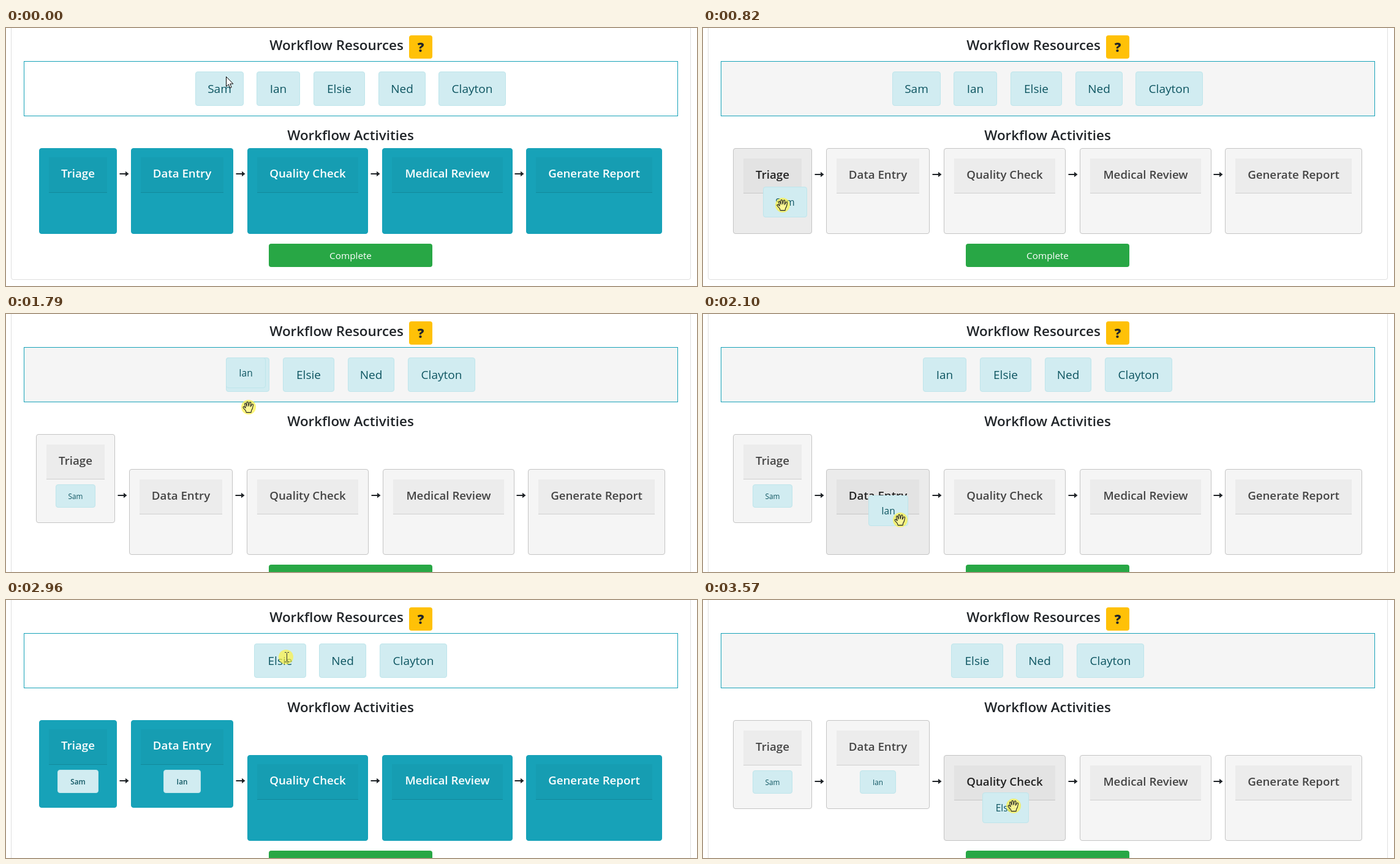
Write an HTML page that moves like this. It is 1128 by 421 pixels and loops after 3.67 s.

```html
<!DOCTYPE html>
<html lang="en">
<head>
<meta charset="utf-8">
<title>Workflow</title>
<style>
  html, body { margin: 0; width: 100%; height: 100%; overflow: hidden; background: #fff; }
  body { font-family: "Open Sans", "Noto Sans", sans-serif; color: #212529; }
  #stage { position: relative; width: 1128px; height: 421px; overflow: hidden; }
  #stage * { box-sizing: border-box; }
  #stage div { position: absolute; text-align: center; white-space: nowrap; }
  svg { position: absolute; overflow: visible; }

  .card { border: 1px solid #dfdfdf; border-radius: 4px; }
  .title { height: 30px; line-height: 30px; font-size: 22.4px; font-weight: 600; }
  .help { left: 658px; top: 12px; width: 38px; height: 38px; line-height: 38px; border-radius: 4px;
          background: #ffc107; font-size: 21px; font-weight: 800; }
  .pool { left: 29px; top: 54px; width: 1068px; height: 90px; border: 1px solid #17a2b8; }
  .tile, .chip, .ghost { background: #d1ecf1; border: 1px solid #bee5eb; border-radius: 4px; color: #0c5460; }
  .tile { height: 56px; line-height: 55px; font-size: 19px; }
  .chip { height: 38px; line-height: 37px; font-size: 11.7px; font-weight: 600; }
  .ghost { height: 50px; line-height: 49px; font-size: 15.5px; }
  .step { border-radius: 4px; background: #17a2b8; border: 1px solid #17a2b8; color: #fff; }
  .head { left: 15px; right: 15px; top: 14px; height: 58px; line-height: 52px; font-size: 18.7px; font-weight: 600;
          background: rgba(0,0,0,.03); border-bottom: 1px solid rgba(0,0,0,.125); }
  .done { left: 429px; width: 267px; height: 38px; line-height: 38px; border-radius: 4px;
          background: #28a745; color: #fff; font-size: 15.3px; }

  .drag .pool { background: #f5f5f5; }
  .drag .step { background: #f5f5f5; border-color: #c4c4c4; color: #444; }
  .drag .head { left: 16px; right: 16px; top: 16px; height: 57px; line-height: 51px; background: rgba(0,0,0,.035); }
  .drag .chip { font-weight: 400; }
  .drag .pool.over { background: #ececec; }
  .drag .step.over { background: #ebebeb; color: #222; }
</style>
</head>
<body>
<div id="stage"></div>
<script>
const LOOP = 3670, DROP_SHIFT = 57, GHOST_LAG = 80;
const stage = document.getElementById('stage');

// name, tile width, ghost width, chip width, grab offset
const people = [
  { name: 'Sam', w: 79, ghost: 72, chip: 67, grab: [32, 30] },
  { name: 'Ian', w: 71, ghost: 65, chip: 61, grab: [52, 40] },
  { name: 'Elsie', w: 84.4, ghost: 76, grab: [51, 22] },
  { name: 'Ned', w: 76.5 },
  { name: 'Clayton', w: 110 }
];
// label, [left, right] at rest, [left, right] while dragging
const steps = [
  ['Triage', [54, 181], [49, 178]],
  ['Data Entry', [204, 371], [201, 370]],
  ['Quality Check', [394, 591], [393, 592]],
  ['Medical Review', [614, 827], [615, 830]],
  ['Generate Report', [849, 1071], [852, 1076]]
];
const drags = [
  { press: 150, start: 250, drop: 930 },
  { press: 1540, start: 1740, drop: 2400 },
  { press: 2860, start: 3010, drop: LOOP }
];
// time, x, y of the pointer
const path = [
  [0, 359, 79], [50, 357, 82], [150, 341, 101], [250, 341, 101], [320, 334, 112],
  [370, 321, 132], [460, 257, 193], [600, 180, 252], [740, 130, 289], [930, 130, 289],
  [1080, 187, 257], [1360, 401, 135], [1540, 411, 111], [1740, 411, 111],
  [1880, 368, 225], [2020, 322, 336], [2400, 322, 336], [2710, 457, 93],
  [3010, 457, 93], [3150, 478, 200], [3290, 503, 315], [3490, 507, 336], [LOOP, 507, 336]
];
// moments at which the 50 ms tick starts afresh
const ticks = [0, 370, 400, 440, 820, 850, 880, 1130, 1360, 1740, 2100, 2400, 2860, 3420];

function add(cls, text = '', parent = stage) {
  const el = document.createElement('div');
  el.className = cls;
  el.textContent = text;
  parent.appendChild(el);
  return el;
}

function addSvg(body) {
  stage.insertAdjacentHTML('beforeend', `<svg width="1" height="1">${body}</svg>`);
  return stage.lastElementChild;
}

function place(el, x, y, w, h) {
  el.style.left = x + 'px';
  el.style.top = y + 'px';
  if (w !== undefined) el.style.width = w + 'px';
  if (h !== undefined) el.style.height = h + 'px';
}

function show(el, on) {
  el.style.display = on ? '' : 'none';
}

const card = add('card');
place(add('title', 'Workflow Resources'), 409, 13, 261);
add('help', '?');
place(add('title', 'Workflow Activities'), 432, 160, 261);
const pool = add('pool');
const tiles = people.map(p => add('tile', p.name));
const boxes = steps.map(([label]) => {
  const el = add('step');
  add('head', label, el);
  return el;
});
const chips = people.slice(0, 2).map(p => add('chip', p.name));
const arrows = steps.slice(1).map(() =>
  addSvg('<path d="M-7.5-1H2V-4.2L7.5 0L2 4.2V1H-7.5Z" fill="#212529"/>'));
const complete = add('done', 'Complete');
const ghost = add('ghost');

const glow = addSvg('<circle r="12" fill="#fff13c" fill-opacity=".68"/>');
const pointer = addSvg('<path d="M.5 .5V16.5L4.2 13L6.8 18.8L9.2 17.7L6.7 12.1H11.8Z" fill="#fff" stroke="#000"/>');
const beam = addSvg('<path d="M-2-7.5H.5M2.5-7.5H5M1.5-6.5V7M-2 8H.5M2.5 8H5" fill="none" stroke="#333"/>');
const hand = addSvg('<path d="M-3.5 8L-4.5 5L-8 1.2Q-8.8-.6-7-.9L-4.4 1.2L-6-4.6Q-5.8-6.6-4.2-5.6' +
  'L-2.6-1.2L-2.8-7.2Q-1.6-8.8-.6-7.2L.2-1.4L1.4-7Q2.8-8.2 3.6-6.6L3-.8L5.4-4.6Q7-5 7-3.4' +
  'L5.8 2.2L4.2 5.2L3.8 8Z" transform="scale(1.08)" fill="#fffaa0" fill-opacity=".75" stroke="#222" stroke-linejoin="round"/>');

function pointAt(t) {
  const i = Math.max(1, path.findIndex(p => p[0] >= t));
  const [t0, x0, y0] = path[i - 1], [t1, x1, y1] = path[i];
  const k = (t - t0) / (t1 - t0);
  return [Math.round(x0 + (x1 - x0) * k), Math.round(y0 + (y1 - y0) * k)];
}

function snap(t) {
  const base = ticks.filter(v => v <= t).pop();
  return base + Math.floor((t - base) / 50) * 50;
}

function layoutTiles(placed) {
  const gap = 21.7;
  const left = people.slice(placed);
  let x = 562.4 - (left.reduce((sum, p) => sum + p.w, 0) + gap * (left.length - 1)) / 2;
  people.forEach((p, i) => {
    show(tiles[i], i >= placed);
    if (i < placed) return;
    const start = Math.round(x);
    place(tiles[i], start, 71, Math.round(x + p.w) - start);
    x += p.w + gap;
  });
}

function layoutSteps(placed, dragging, [px, py]) {
  const shift = placed ? DROP_SHIFT : 0;
  const spans = steps.map(s => s[dragging ? 2 : 1]);
  spans.forEach(([a, b], i) => {
    const filled = i < placed;
    const top = 196 + (filled ? 0 : shift);
    const height = filled ? (dragging ? 145 : 143) : 140;
    place(boxes[i], a, top, b - a, height);
    boxes[i].classList.toggle('over', px >= a && px < b && py >= top && py < top + height);
    if (i) place(arrows[i - 1], (spans[i - 1][1] + a) / 2, (dragging ? 239 : 238) + shift);
    if (i < chips.length) {
      const w = people[i].chip - (dragging ? 2 : 0);
      show(chips[i], filled);
      place(chips[i], Math.round((a + b - w) / 2), dragging ? 278 : 277, w);
    }
  });
  place(card, 8, -10, 1110, 421 + shift);
  place(complete, 429, 352 + shift);
}

function render(time) {
  const t = snap(time % LOOP);
  const placed = drags.filter(d => t >= d.drop).length;
  const drag = drags[placed];
  const pressed = t >= drag.press;
  const dragging = t >= drag.start;
  const at = pointAt(t);

  stage.classList.toggle('drag', dragging);
  pool.classList.toggle('over', at[1] < 144);
  layoutTiles(placed);
  layoutSteps(placed, dragging, at);

  show(ghost, dragging);
  if (dragging) {
    const p = people[placed], [x, y] = pointAt(t - GHOST_LAG);
    ghost.textContent = p.name;
    place(ghost, x - p.grab[0], y - p.grab[1], p.ghost);
  }

  show(glow, pressed);
  show(pointer, !pressed);
  show(beam, pressed && !dragging);
  show(hand, dragging);
  [glow, pointer, beam, hand].forEach(el => place(el, ...at));
}

const begin = performance.now();
function frame() {
  render(performance.now() - begin);
  requestAnimationFrame(frame);
}
render(0);
requestAnimationFrame(frame);
</script>
</body>
</html>
```
